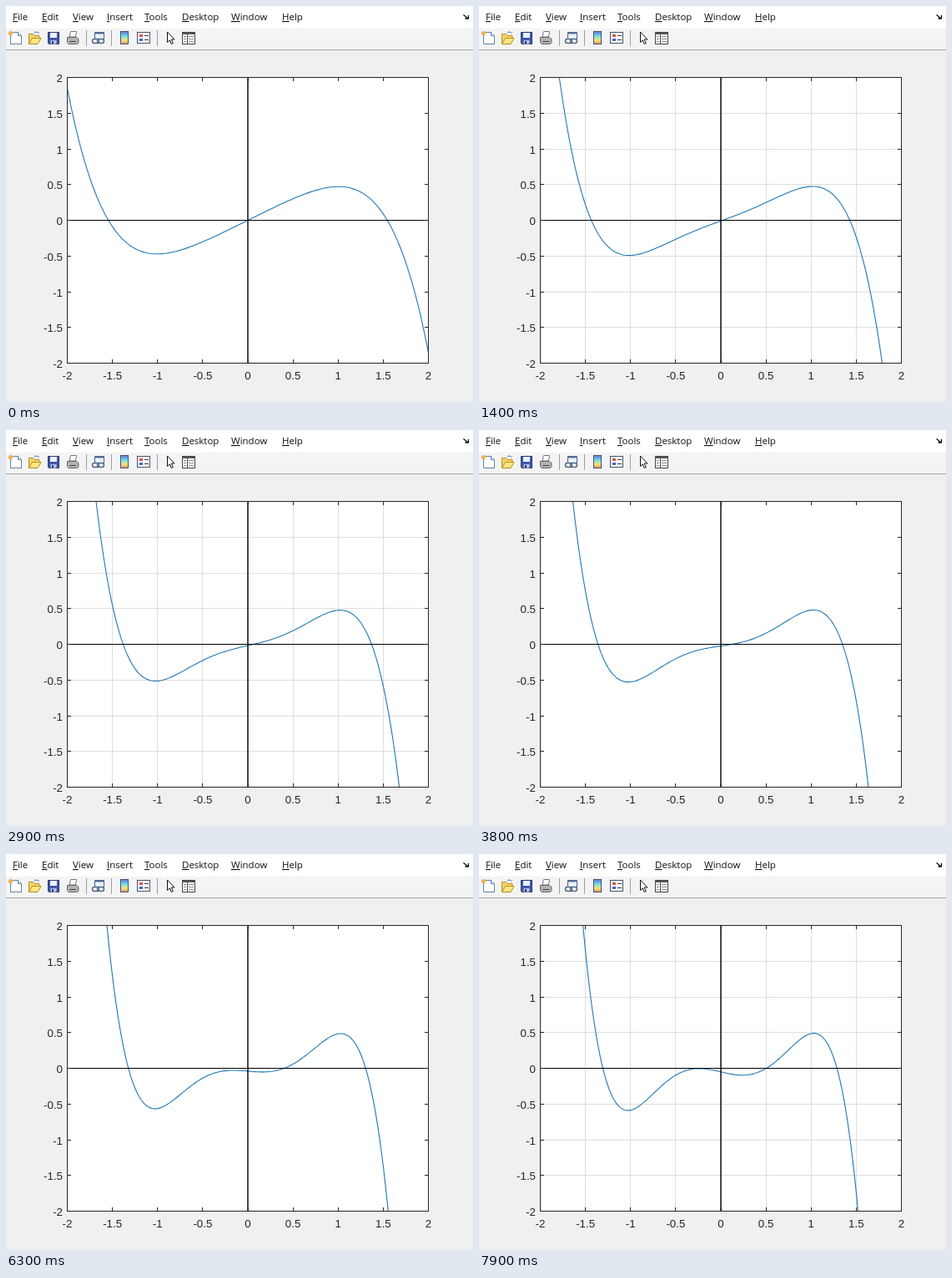
An HTML page that plays this animation: 560 px wide and 474 px high, repeating every 8 s.

```html
<!DOCTYPE html>
<html lang="en">
<head>
<meta charset="utf-8">
<style>
  html, body { margin: 0; width: 100%; height: 100%; overflow: hidden; background: #f0f0f0; }
  svg { display: block; }
  .menu { font: 11.5px "Open Sans", "Noto Sans", sans-serif; fill: #111; }
  .menu tspan { text-decoration: underline; }
  .labels { font: 13.33px "Liberation Sans", Arial, sans-serif; fill: #262626; }
  .crisp { shape-rendering: crispEdges; }
</style>
</head>
<body>
<svg width="560" height="474" viewBox="0 0 560 474">
  <rect width="560" height="27" fill="#fff"/>
  <rect y="27" width="560" height="25" fill="#f4f4f4"/>
  <path class="crisp" d="M0 52.5H560" stroke="#a5a5a5"/>
  <g class="menu" id="menu"></g>
  <path d="M548.5 10.5l5 4M554.5 11v4h-4" fill="none" stroke="#111" stroke-width="1.3"/>

  <path class="crisp" d="M96.5 29V48M126.5 29V48M181.5 29V48" stroke="#a0a0a0"/>
  <!-- new -->
  <path d="M5.5 31.5h9l4 4v10h-13z" fill="#fff" stroke="#5f7fa8"/>
  <path d="M14.5 31.5v4h4" fill="#dce8f5" stroke="#5f7fa8"/>
  <circle cx="5.5" cy="32.5" r="2.6" fill="#efb04a"/>
  <!-- open -->
  <path d="M27.5 45.5v-12h5l1.5 2h6v3" fill="#f5d36b" stroke="#b98d22"/>
  <path d="M27.5 45.5l4-7h10.5l-4 7z" fill="#ffe680" stroke="#b98d22"/>
  <path d="M34 32q3-2.5 5 .5l1-1" fill="none" stroke="#477bb5"/>
  <!-- save -->
  <path d="M50.5 31.5h13v14h-12l-1-1z" fill="#4257a8" stroke="#273577"/>
  <path d="M53 32h8v6h-8z" fill="#eef2fb"/>
  <path d="M53.5 41h7v4.5h-7z" fill="#b8c2dd"/>
  <path d="M55 42h2v3h-2z" fill="#273577"/>
  <!-- print -->
  <path d="M76 37l1.5-6.5h7l-1 6.5z" fill="#fff" stroke="#777"/>
  <path d="M73.5 37.5h11l2.5 2v4.5l-2 1.5h-10l-1.5-2z" fill="#b5b5b5" stroke="#666"/>
  <path d="M76 42.5h8" stroke="#444"/>
  <!-- link -->
  <path d="M106.5 31.5h11v8h-11z" fill="#eaf1fa" stroke="#51617c"/>
  <path d="M106 32.5h12" stroke="#51719f" stroke-width="2"/>
  <rect x="103.5" y="39.5" width="8" height="5" rx="2.5" fill="none" stroke="#53698c" stroke-width="1.5"/>
  <rect x="109.5" y="39.5" width="8" height="5" rx="2.5" fill="none" stroke="#53698c" stroke-width="1.5"/>
  <!-- colour bar -->
  <linearGradient id="bar" x2="0" y2="1">
    <stop stop-color="#5a78d8"/><stop offset=".4" stop-color="#7fdde0"/>
    <stop offset=".7" stop-color="#f3e678"/><stop offset="1" stop-color="#e58a5a"/>
  </linearGradient>
  <rect x="137.5" y="30.5" width="9" height="15" fill="url(#bar)" stroke="#44546e"/>
  <!-- legend -->
  <rect x="157.5" y="31.5" width="15" height="13" fill="#fff" stroke="#44546e"/>
  <path d="M160 34h4v3h-4z" fill="#d9534a"/>
  <path d="M160 39h4v3h-4z" fill="#4660c8"/>
  <path d="M166 35.5h5M166 40.5h5" stroke="#333"/>
  <!-- pointer -->
  <path d="M193.5 31v12.5l2.8-2.7 2 4.7 2-.9-2-4.6h3.8z" fill="#fff" stroke="#111"/>
  <!-- panel -->
  <rect x="211.5" y="31.5" width="15" height="14" fill="#fff" stroke="#444"/>
  <path d="M211 33h16" stroke="#555" stroke-width="2"/>
  <path d="M217.5 34v11" stroke="#444"/>
  <path d="M213 36.5h3M213 39.5h3M213 42.5h3M219 36.5h6M219 39.5h6M219 42.5h6" stroke="#888"/>

  <clipPath id="clip"><rect x="73" y="85" width="434" height="343"/></clipPath>
  <rect x="73" y="85" width="434" height="343" fill="#fff"/>
  <path class="crisp" id="grid" stroke="#dedede"/>
  <path id="curve" fill="none" stroke="#1f78b4" stroke-width="1.1" clip-path="url(#clip)"/>
  <path d="M73 256.5H507" stroke="#000" stroke-width="1.2"/>
  <path d="M290 85V428" stroke="#000" stroke-width="1.4"/>
  <path class="crisp" id="ticks" stroke="#262626"/>
  <rect class="crisp" x="73.5" y="85.5" width="433" height="342" fill="none" stroke="#262626"/>
  <g class="labels" id="labels"></g>
</svg>
<script>
const $ = id => document.getElementById(id);
const px = x => 290 + 108.25 * x;
const py = y => 256.5 - 85.5 * y;
const snap = v => Math.floor(v) + 0.5;

const menus = { File: 8, Edit: 43, View: 80, Insert: 121, Tools: 166, Desktop: 211, Window: 270, Help: 331 };
$('menu').innerHTML = Object.entries(menus).map(([name, x]) =>
  `<text x="${x}" y="17"><tspan>${name[0]}</tspan>${name.slice(1)}</text>`).join('');

let grid = '', ticks = '', labels = '';
for (let v = -2; v <= 2; v += 0.5) {
  const x = snap(px(v)), y = snap(py(v));
  if (Math.abs(v) < 2) grid += `M${x} 86V427M74 ${y}H506`;
  ticks += `M${x} 85v5M${x} 428v-5M73 ${y}h5M507 ${y}h-5`;
  labels += `<text x="${px(v)}" y="447" text-anchor="middle">${v}</text>
    <text x="68" y="${y + 5.5}" text-anchor="end">${v}</text>`;
}
$('grid').setAttribute('d', grid);
$('ticks').setAttribute('d', ticks);
$('labels').innerHTML = labels;

// Odd quintic whose coefficients drift linearly with time
function curvePath(s) {
  const a = -0.05 * s, b = 0.627 - 0.92 * s, c = -0.078 + 1.867 * s, d = -0.0775 - 0.8825 * s;
  const points = [];
  for (let i = -100; i <= 100; i++) {
    const x = i / 50, q = x * x;
    points.push(px(x).toFixed(2) + ' ' + py(a + x * (b + q * (c + q * d))).toFixed(2));
  }
  return 'M' + points.join('L');
}

const start = performance.now();
let last = -1;
function draw(now) {
  const step = Math.floor(Math.max(0, now - start) % 8000 / 100);
  if (step !== last) {
    last = step;
    $('curve').setAttribute('d', curvePath(step / 79));
    // The grid blinks off whenever the plot is redrawn
    $('grid').style.display = step * 2 % 5 < 2 ? 'none' : '';
  }
  requestAnimationFrame(draw);
}
draw(start);
</script>
</body>
</html>
```
